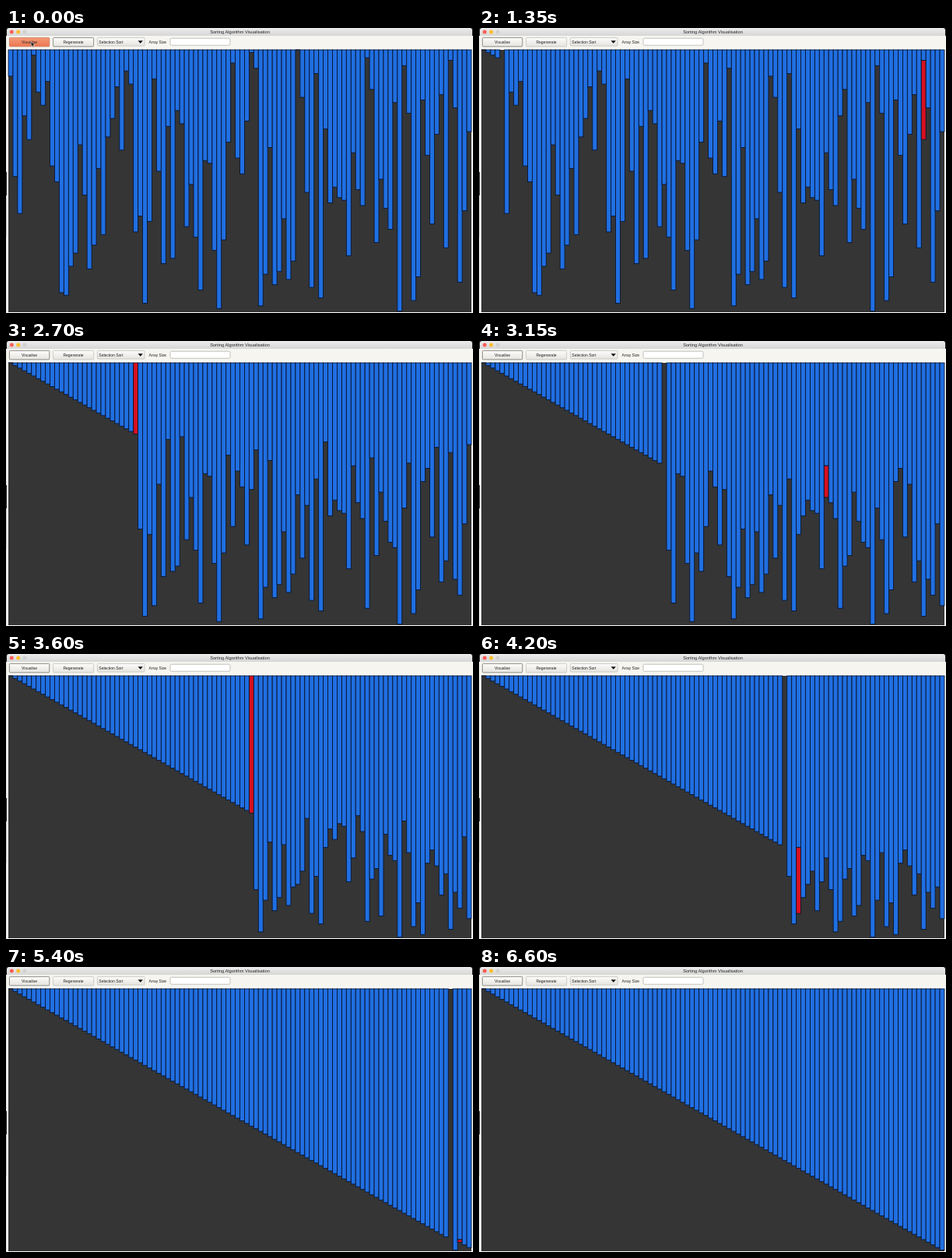
An HTML page with a canvas for the animation above (6650 ms loop, 600x366 px).

```html
<!DOCTYPE html>
<html lang="en">
<head>
<meta charset="utf-8">
<title>Sorting Algorithm Visualisation</title>
<style>
  html, body { margin: 0; width: 100%; height: 100%; overflow: hidden; background: #f6f5f0; }
  svg, canvas { position: absolute; left: 0; top: 0; width: 600px; height: 366px; }
  text { font: 5px "Liberation Sans", Arial, sans-serif; fill: #222; }
  .mid { text-anchor: middle; }
  .box { stroke: #c4c2bd; stroke-width: .8; }
  .focus { stroke: #77756f; }
  .hover { fill: url(#hot); stroke: #c9765a; }
</style>
</head>
<body>
<canvas id="bars" width="600" height="366"></canvas>
<svg viewBox="0 0 600 366">
  <defs>
    <linearGradient id="bar" x2="0" y2="1"><stop stop-color="#ececec"/><stop offset="1" stop-color="#d6d6d6"/></linearGradient>
    <linearGradient id="face" x2="0" y2="1"><stop stop-color="#fcfcfb"/><stop offset="1" stop-color="#e6e4df"/></linearGradient>
    <linearGradient id="hot" x2="0" y2="1"><stop stop-color="#f59a78"/><stop offset="1" stop-color="#ec7650"/></linearGradient>
  </defs>
  <rect width="600" height="10" fill="#111"/>
  <path d="M1 10V3q0-3 3-3H596q3 0 3 3V10z" fill="url(#bar)"/>
  <circle cx="7.3" cy="5" r="2.5" fill="#fb5f57"/>
  <circle cx="15.7" cy="5" r="2.5" fill="#fbbd2e"/>
  <circle cx="24" cy="5" r="2.5" fill="#d0d0ce"/>
  <text class="mid" x="300.5" y="7" style="font-size:5.7px">Sorting Algorithm Visualisation</text>
  <rect id="run" class="box" x="4.4" y="12.4" width="51.4" height="11.4" rx="1" fill="url(#face)"/>
  <text class="mid" x="30" y="19.9">Visualise</text>
  <rect id="regen" class="box" x="60.6" y="12.4" width="52" height="11.4" rx="1" fill="url(#face)"/>
  <text class="mid" x="86.5" y="19.9">Regenerate</text>
  <rect class="box" x="117.4" y="12.4" width="60.6" height="10.6" rx="1" fill="url(#face)"/>
  <text x="119.3" y="19.7">Selection Sort</text>
  <path d="M169.5 16.2h6.4l-3.2 3.6z" fill="#111"/>
  <text x="183.5" y="19.7" style="font-size:4.9px">Array Size</text>
  <rect class="box" x="211" y="13.2" width="77" height="9" rx="1.5" fill="#fff" style="stroke:#b5b3ae"/>
  <path d="M.5 10V185M.5 268V366" stroke="#e4e3de"/>
  <path d="M.5 185V215" stroke="#222"/>
  <path d="M.5 215V268" stroke="#c9c8c2"/>
  <path id="cursor" d="M0 0V6.5L1.5 5.2L2.6 7.6L3.6 7.1L2.6 4.9H4.7Z" fill="#111" stroke="#fff" stroke-width=".5"/>
</svg>
<script>
const LOOP = 6650, COUNT = 100, LEFT = 3, TOP = 28, WIDTH = 5.95, UNIT = 3.39;
const BLUE = '#206fe2', RED = '#d8101f';
const start = [
  10, 48, 62, 25, 34, 2, 16, 21, 12, 44, 50, 92, 93, 82, 77, 36, 55, 83, 74, 45,
  70, 33, 26, 14, 38, 8, 13, 69, 63, 96, 65, 11, 46, 81, 29, 79, 23, 28, 67, 51,
  71, 91, 42, 43, 76, 98, 72, 35, 5, 41, 47, 27, 1, 7, 97, 85, 37, 89, 84, 64,
  87, 80, 0, 18, 54, 90, 9, 94, 30, 58, 52, 56, 57, 78, 39, 53, 59, 3, 15, 73,
  49, 60, 68, 20, 99, 6, 24, 95, 86, 19, 40, 66, 32, 17, 75, 4, 22, 88, 61, 31];
// [time in ms, swaps done]
const pace = [[750, 0], [1350, 4.2], [1400, 4.2], [1450, 5.2], [1700, 9.6], [2700, 27.6], [2750, 27.6],
  [3600, 52.6], [3700, 52.6], [4800, 80.2], [5400, 95.2], [5650, 100]];

const byId = id => document.getElementById(id);
const ctx = byId('bars').getContext('2d');

function progress(t) {
  if (t < pace[0][0]) return -1;
  const k = pace.findIndex(p => p[0] > t);
  if (k < 0) return COUNT;
  const [t0, v0] = pace[k - 1], [t1, v1] = pace[k];
  return v0 + (v1 - v0) * (t - t0) / (t1 - t0);
}

function bar(i, from, to, color) {
  const box = [LEFT + i * WIDTH, TOP + from * UNIT, WIDTH, (to - from) * UNIT];
  ctx.fillStyle = color;
  ctx.fillRect(...box);
  ctx.strokeRect(...box);
}

function drawBars(t) {
  const p = progress(t), step = Math.floor(p), swapping = p - step < .5;
  const a = start.slice();
  for (let i = 0; i < step; i++) {
    a[a.indexOf(i)] = a[i];
    a[i] = i;
  }
  const active = step >= 0 && step < COUNT;
  const min = a.indexOf(step);
  if (active) {
    a[min] = a[step];
    a[step] = step;
  }
  ctx.fillStyle = '#fff';
  ctx.fillRect(1, 26.5, 598, 340);
  ctx.fillStyle = '#353535';
  ctx.fillRect(LEFT, TOP, COUNT * WIDTH, 337);
  ctx.strokeStyle = '#0a1630';
  ctx.lineWidth = .9;
  a.forEach((v, i) => {
    if (active && swapping && i === step) return;
    if (active && swapping && i === min) {
      bar(i, 0, step, BLUE);
      bar(i, step, v, RED);
    } else bar(i, 0, v, active && i === step ? RED : BLUE);
  });
}

function frame(now) {
  const t = Math.floor(now % LOOP / 50) * 50;
  const hover = t < 450;
  byId('run').setAttribute('class', hover ? 'box hover' : 'box focus');
  byId('regen').setAttribute('class', t < 50 ? 'box focus' : 'box');
  const lift = Math.max(0, t - 300) / 350 * 28;
  byId('cursor').setAttribute('transform', `translate(32.3 ${17.2 - lift})`);
  drawBars(t);
  requestAnimationFrame(frame);
}
const begin = performance.now();
(function tick() { frame.call(null, 0); })();
requestAnimationFrame = (raf => f => raf(() => f(performance.now() - begin)))(requestAnimationFrame);
</script>
</body>
</html>
```
